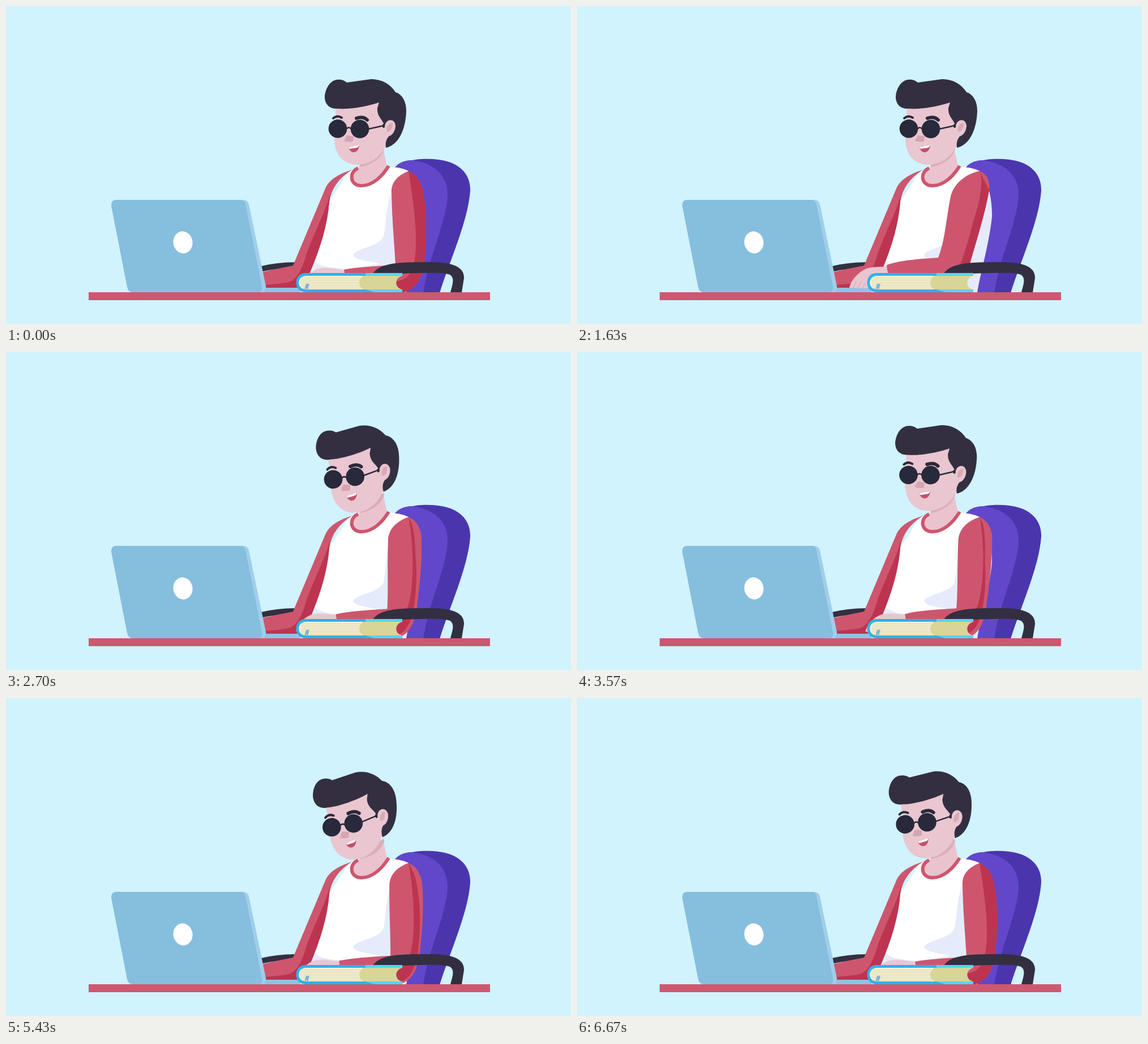
Recreate the animation shown at these times as an HTML page. Size 998 by 561 pixels, loop 6700 ms.

```html
<!DOCTYPE html>
<html lang="en">
<head>
<meta charset="utf-8">
<title>Working at the desk</title>
<style>
html, body { margin: 0; width: 100%; height: 100%; overflow: hidden; background: #d0f3fd; }
svg { display: block; width: 100%; height: 100%; }
.dark { fill: #332f41; }
.red { fill: #cd566e; }
.deep { fill: #bd3450; }
.skin { fill: #e9c6d0; }
.line { fill: none; stroke: #2a2a3a; stroke-linecap: round; }
</style>
</head>
<body>
<svg viewBox="0 0 998 561">
  <!-- chair -->
  <path fill="#4b35ad" d="M684 288C700 270 742 266 775 273C805 280 821 300 820 326C816 380 785 446 766 506H706Z"/>
  <path fill="#6247cb" d="M684 288C692 277 702 273 714 272C752 275 781 296 780 335C777 385 747 440 737 506H700Z"/>
  <path class="line" stroke-width="10" style="stroke:#332f41" d="M450 464Q480 457 515 457"/>

  <!-- torso -->
  <path fill="#e5ebfa" d="M606 291L672 283L711 291C728 305 734 350 733 372C728 420 713 468 707 506H530L540 470C556 425 568 385 571 345Z"/>
  <path fill="#fff" d="M606 291L672 283Q697 284 711 291C690 300 683 320 677 340C671 360 671 388 667 406C660 425 618 427 613 439C615 449 645 450 660 455L600 464C580 461 556 462 546 450C558 415 568 385 571 345Z"/>
  <path class="red" d="M611 289C585 297 570 308 564 322L507 458Q480 463 454 469V497H515L537 470C556 425 568 385 571 345Q577 310 611 289Z"/>
  <path class="deep" d="M573 329C566 360 542 405 530 440C523 465 514 482 500 487Q480 491 454 492V497H515L537 470C556 425 568 385 571 345Z"/>
  <path fill="#8fc3e6" d="M452 497H520V505H452Z"/>
  <path fill="#eac3ce" d="M625 280L666 250L673 283C664 300 646 315 629 316C609 315 606 295 625 284Z"/>
  <path fill="#dbadbb" d="M624 284C646 281 662 269 668 253L667 248L626 276Z"/>
  <path fill="none" stroke="#cd566e" stroke-width="6" d="M622 286C605 293 607 317 628 317C648 317 665 300 676 282"/>

  <!-- head -->
  <g id="head">
    <path class="skin" d="M582 176L583 205L580 232C579 262 597 281 622 280C645 279 663 264 671 246L680 220L668 168L640 160Z"/>
    <path class="dark" d="M602 135L645 129C664 129 679 138 688 152C700 156 707 168 707 185C706 220 692 246 671 250Q669 238 676 230L684 215L669 214C667 200 655 197 656 180L659 170C640 177 605 183 586 181C570 182 563 172 563 160C564 145 573 131 585 130Q595 129 602 135Z"/>
    <path class="skin" d="M669 212C671 199 686 197 688 211C688 224 677 234 671 228Z"/>
    <path fill="#d9a9b4" d="M683 206C674 207 671 215 673 222C680 222 683 214 683 206Z"/>
    <path fill="#d5a5b1" d="M602 228L597 238Q605 241 613 239L614 230Z"/>
    <path fill="#c4506c" d="M605 249L624 245C624 254 618 259 613 258C608 257 606 253 605 249Z"/>
    <path fill="#fff" d="M605 249L624 245Q623 249 620 250L607 252Z"/>
    <path class="line" stroke-width="4" d="M578 198Q585 192 593 197"/>
    <path class="line" stroke-width="6" d="M619 198Q631 194 638 201"/>
    <path class="line" stroke-width="2.5" d="M602 216Q605 213 609 216M640 217L667 211"/>
    <path class="line" stroke-width="4" d="M667 210V213"/>
    <circle cx="586" cy="216.500" r="16.300" fill="#28293a"/>
    <circle cx="625" cy="217" r="16.300" fill="#28293a"/>
  </g>

  <!-- near arm -->
  <path id="hand" class="skin"/>
  <path id="fingers" fill="none" stroke="#d3a3b4" stroke-width="1"/>
  <path id="sleeve" class="red"/>
  <path id="shade" class="deep"/>
  <path class="dark" d="M648 472C658 457 680 452 730 452C778 450 810 456 809 480L805 505H785C789 490 793 480 784 474C770 469 740 471 700 472Z"/>

  <!-- book -->
  <path fill="#2cb3ea" d="M636 471H529C507 471 507 505 529 505H650V500H636V476Z"/>
  <path fill="#56d5f2" d="M635 471H700V476H635ZM635 500H700V505H650Z"/>
  <path fill="#fdf9e3" d="M634 476H530C513 476 513 500 530 500H634Z"/>
  <path id="pages" stroke="#d3cd98" stroke-width="1"/>
  <path fill="#d8d596" d="M631 476H700C686 480 686 496 699 500H631C622 495 622 481 631 476Z"/>
  <path fill="#7fb5dc" d="M530 490H536L533 501L531 498L527 501Z"/>

  <!-- laptop and desk -->
  <path fill="#a0ceeb" d="M196 342H418Q427 342 429 350L459 494Q460 505 452 505H224Z"/>
  <path fill="#86bedd" d="M195 342H413Q421 342 423 350L452 494Q454 505 445 505H224Q216 505 214 496L186 353Q185 342 195 342Z"/>
  <ellipse cx="312.500" cy="417" rx="17" ry="19.500" fill="#fff" transform="rotate(-10 312.500 417)"/>
  <path fill="#cd5870" d="M146 505H855V519H146Z"/>
</svg>
<script>
const LOOP = 6700;
const $ = id => document.getElementById(id);

// Each part: arm drawn back, arm reaching to the keyboard.
const arm = {
  hand: [
    'M525 490C528 482 535 471 545 466C558 458 580 463 598 466L598 480L530 500Z',
    'M481 497C484 485 495 470 512 463C525 459 540 461 548 459L548 480L512 498Z'
  ],
  fingers: [
    'M535 490L529 499M544 491L538 500M553 492L547 500',
    'M493 486L488 497M502 487L496 497M509 488L505 497'
  ],
  sleeve: [
    'M711 291C690 300 680 312 681 330C682 380 686 420 688 457C650 459 620 461 597 465L600 480L700 506C725 500 737 480 740 440C744 390 742 350 736 322C730 304 722 296 711 291Z',
    'M711 291C688 296 666 312 660 336C652 375 650 415 638 444C610 446 570 448 547 457L550 480L670 500C680 496 688 478 693 458C705 415 720 370 728 325C730 308 724 296 711 291Z'
  ],
  shade: [
    'M711 291C716 320 725 380 724 420C723 460 716 482 689 486L689 506L700 506C725 500 737 480 740 440C744 390 742 350 736 322C730 304 722 296 711 291Z',
    'M711 291C719 310 710 350 700 380C692 410 684 440 675 460C670 480 660 485 650 486L650 500L670 500C680 496 688 478 693 458C705 415 720 370 728 325C730 308 724 296 711 291Z'
  ]
};

// Keys are [time, value] pairs, eased in between.
const reach = [[0, 0], [500, 0], [1420, 1], [1800, 1], [3200, 0], [4120, 1], [4500, 1], [5775, 0], [LOOP, 0]];
const nod = [[0, 0], [1650, 0], [2250, 1], [3550, .04], [4550, 1], [6200, 1], [7250, 0]];

function valueAt(keys, t) {
  const i = keys.findIndex(k => k[0] > t);
  const [t0, a] = keys[i - 1], [t1, b] = keys[i];
  const u = (t - t0) / (t1 - t0);
  return a + (b - a) * u * u * (3 - 2 * u);
}

function blend([from, to], p) {
  const ends = to.match(/\d+/g);
  let i = 0;
  return from.replace(/\d+/g, n => (+n + (ends[i++] - n) * p).toFixed(2));
}

let lines = '';
for (let y = 478.5; y < 499; y += 2.5) lines += `M${519 + Math.abs(y - 488) / 3} ${y}H627`;
$('pages').setAttribute('d', lines);

function draw(now) {
  const t = now % LOOP;
  const p = valueAt(reach, t);
  for (const id in arm) $(id).setAttribute('d', blend(arm[id], p));
  $('head').setAttribute('transform', `rotate(${-10.5 * valueAt(nod, t)} 643 280)`);
}

const start = performance.now();
function frame() {
  draw(performance.now() - start);
  requestAnimationFrame(frame);
}
frame();
</script>
</body>
</html>
```
